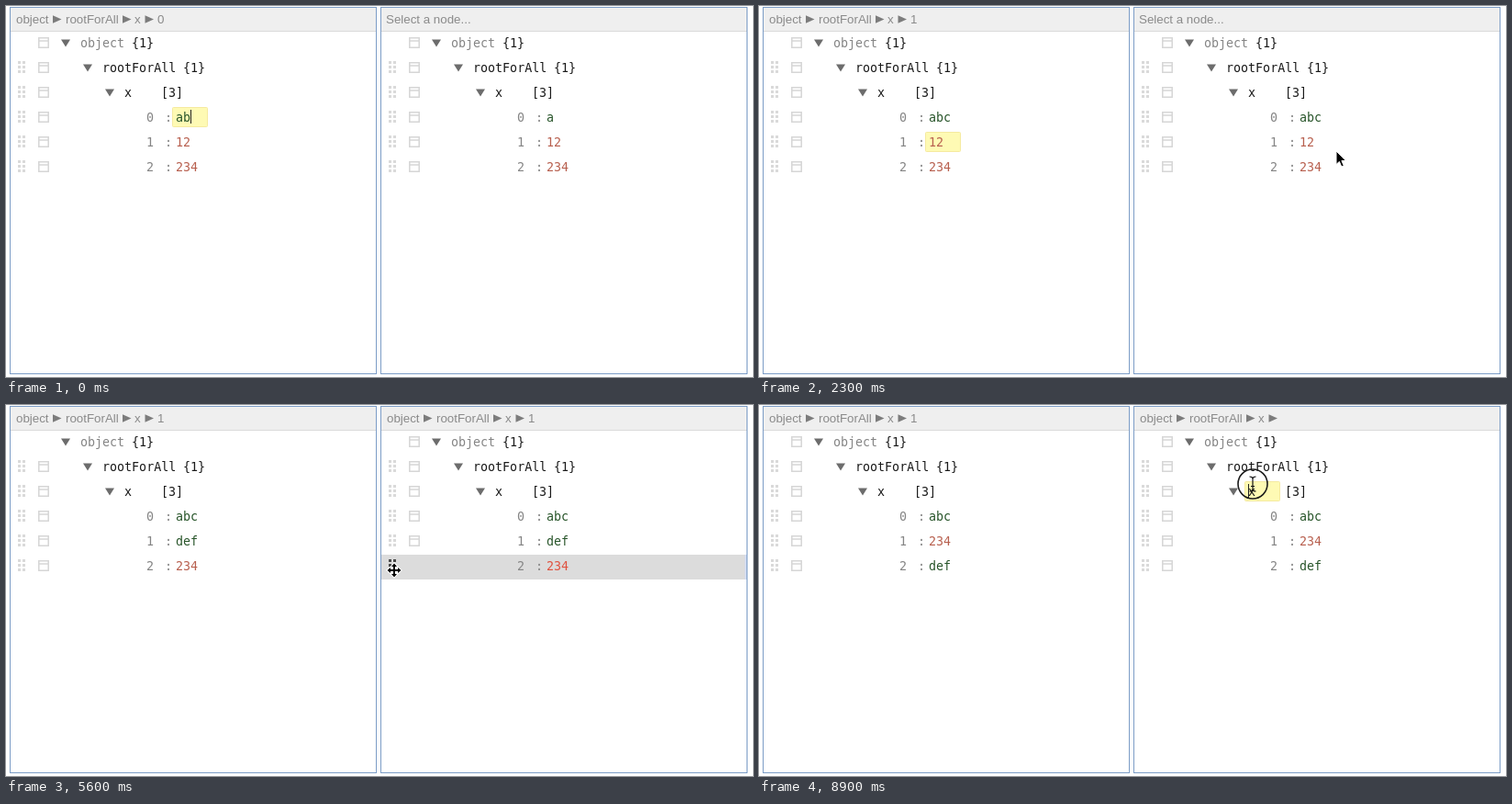
An HTML page that plays this animation: 814 by 404 pixels, repeating every 9100 ms.

```html
<!DOCTYPE html>
<html lang="en">
<head>
<meta charset="utf-8">
<title>Synchronised tree editors</title>
<style>
  html, body { margin: 0; width: 100%; height: 100%; overflow: hidden; background: #fff; }
  svg { display: block; width: 814px; height: 404px; }
  text { font: 13.333px "DejaVu Sans Mono", "Noto Sans Mono", monospace; fill: #1a1a1a; }
  .bar text { font-family: "Liberation Sans", Arial, sans-serif; fill: #8a8a8a; }
  .bar path { fill: #7c7c7c; }
  text.dim { fill: #858585; }
  text.str { fill: #28552a; }
  text.num { fill: #b8604f; }
  text.hot { fill: #e0523f; }
  .field { fill: #fefab4; stroke: #f5eaa0; }
  .fold { fill: #6c6c6c; }
  .dots { fill: #dadada; }
  .dots.on { fill: #4a4a4a; }
  .menu { fill: none; stroke: #d6d6d6; stroke-width: 1.5; }
  .menu.on { stroke: #505050; stroke-width: 2; }
  .ring { fill: none; stroke: #1c1c1c; stroke-width: 1.6; }
</style>
</head>
<body>
<svg id="stage" viewBox="0 0 814 404"></svg>
<script>
const LOOP = 9100, STEP = 100;
const LEFT = 0, RIGHT = 1, PANEL_GAP = 404;
const KEY_GAP = 150, SYNC_LAG = 200, BLINK = 500;

// Moments of the story, in ms
const pickLeft = 800, pickRight = 2800, typeRight = 3500, blur = 4900,
  overRow = 5300, grab = 5500, swap = 6200, drop = 6600, leaveRow = 7400, pickName = 8800;

const stage = document.getElementById('stage');
const rowY = i => 40 + 27 * i;
const within = (t, from, to) => t >= from && t < to;

const text = (x, y, s, cls = '') => `<text x="${x}" y="${y}" class="${cls}">${s}</text>`;
const rect = (x, y, w, h, attr) => `<rect x="${x}" y="${y}" width="${w}" height="${h}" ${attr}/>`;
const group = (x, y, s) => `<g transform="translate(${x} ${y})">${s}</g>`;

// The part of a word typed so far; the other panel follows after a delay
const typed = (word, start, t) => word.slice(0, Math.max(0, Math.floor((t - start) / KEY_GAP) + 1));

function valuesOf(side, t) {
  const lag = own => side === own ? 0 : SYNC_LAG;
  const first = typed('abc', lag(LEFT) - SYNC_LAG, t);
  const second = typed('def', typeRight + lag(RIGHT), t) || '12';
  const swapped = t >= (side === RIGHT ? swap : drop);
  return swapped ? [first, '234', second] : [first, second, '234'];
}

function pathOf(side, t) {
  if (side === LEFT) return t < pickLeft ? '0' : '1';
  if (t <= pickRight) return null;
  if (t >= pickName) return '';
  return within(t, grab + 300, drop) ? '2' : '1';
}

// The field in focus, if any: its panel, row and the time it was entered
function focusAt(t) {
  if (t < pickLeft) return { side: LEFT, row: 3, since: 0, typing: true };
  if (t < pickRight) return { side: LEFT, row: 4, since: pickLeft };
  if (t < typeRight) return { side: RIGHT, row: 4, since: pickRight };
  if (t < blur) return { side: RIGHT, row: 4, since: typeRight, typing: true };
  if (t >= pickName) return { side: RIGHT, row: 2, since: pickName };
}

function header(path) {
  let s = rect(5, 2, 398, 25, 'fill="#efefef"') + rect(5, 27, 398, 1, 'fill="#dadada"');
  if (path === null) {
    s += text(10, 19, 'Select a node...');
  } else {
    s += text(11, 19, 'object') + text(65, 19, 'rootForAll') + text(140, 19, 'x') + text(165, 19, path);
    for (const x of [51, 127, 151.5]) s += `<path d="M${x} 10.2l9.5 4.3l-9.5 4.3z"/>`;
  }
  return `<g class="bar">${s}</g>`;
}

function dots(y, on) {
  let d = '';
  for (let i = 0; i < 6; i++) d += `M${13 + 5 * (i % 2)} ${y - 7 + 5 * (i >> 1)}h3v3h-3z`;
  return `<path class="dots ${on ? 'on' : ''}" d="${d}"/>`;
}

const menu = (y, on) =>
  `<path class="menu ${on ? 'on' : ''}" d="M35.8 ${y - 5.2}h10.4v10.4h-10.4zM35.8 ${y - 2}h10.4"/>`;
const fold = (x, y) => `<path class="fold" d="M${x - 5} ${y - 3.5}h10l-5 8z"/>`;

function field(focus, values, t) {
  const { row, since, typing } = focus;
  const x = row === 2 ? 125.5 : 181.5, y = rowY(row);
  const chars = typing ? values[row - 3].length : 0;
  const lit = typing || Math.floor((t - since) / BLINK) % 2 === 0;
  return rect(x, y - 10.5, 38, 21, 'class="field" rx="1"')
    + (lit ? rect(x + 3.5 + 8 * chars, y - 8, 1, 15, 'fill="#222"') : '');
}

function panel(side, t) {
  const values = valuesOf(side, t), focus = focusAt(t);
  const active = side === RIGHT;
  const hover = active && within(t, overRow, leaveRow) ? (t < swap ? 5 : 4) : 0;
  const picked = active && within(t, drop, pickName) ? 4 : 0;
  const dragging = within(t, grab, drop);
  let s = header(pathOf(side, t));

  if (hover) {
    const y = rowY(hover) - 12;
    s += rect(5, y, 398, 27, 'fill="#dcdcdc"') + rect(401, y, 2, 27, 'fill="#d2dbef"');
    if (picked) s += rect(28, y, 26, 24, 'fill="#fff"');
  }
  for (let i = 0; i < 6; i++) {
    const y = rowY(i);
    if (i) s += dots(y, i === hover);
    if (!(dragging && i === hover)) s += menu(y, i && i === picked);
    if (i < 3) s += fold(65 + 24 * i, y);
  }
  if (focus && focus.side === side) s += field(focus, values, t);

  s += text(81, 45, 'object', 'dim') + text(137, 45, '{1}')
    + text(105, 72, 'rootForAll') + text(193, 72, '{1}')
    + text(129, 99, 'x') + text(169, 99, '[3]');
  values.forEach((v, i) => {
    const y = rowY(i + 3) + 5;
    const cls = isNaN(v) ? 'str' : hover === i + 3 ? 'hot' : 'num';
    s += text(153, y, i, 'dim') + text(173, y, ':', 'dim') + text(185, y, v, cls);
  });
  s += rect(4.5, 1.5, 399, 399, 'fill="none" stroke="#7b9cc6"');
  return group(side * PANEL_GAP, 0, s);
}

// Places where the pointer rests: arrival, departure, position
const rests = [
  { from: 600, to: 600, x: 203, y: 128 },
  { from: pickLeft, to: 1300, x: 195, y: 139 },
  { from: 1800, to: 2000, x: 198, y: 157 },
  { from: 2300, to: 2300, x: 629, y: 158 },
  { from: 2700, to: 4400, x: 598, y: 146 },
  { from: 4800, to: 5000, x: 592, y: 230 },
  { from: 5400, to: 5900, x: 423, y: 180 },
  { from: 6400, to: 7200, x: 418, y: 149 },
  { from: 7500, to: 8100, x: 452, y: 120 },
  { from: 8700, to: LOOP, x: 538, y: 86 }
];

function pointerPos(t) {
  const i = rests.findIndex(r => t <= r.to);
  const b = rests[i], a = rests[i - 1] || b;
  const k = t >= b.from ? 1 : (t - a.to) / (b.from - a.to);
  return [a.x + (b.x - a.x) * k, a.y + (b.y - a.y) * k];
}

const shapes = {
  beam: '<path d="M-3.5-8q3 0 3.5 2q.5-2 3.5-2M0-6V6M-3.5 8q3 0 3.5-2q.5 2 3.5 2M-2 2.5h4" fill="none" stroke="#111" stroke-width="1.2"/>',
  arrow: '<path d="M0 0V14.5L3.4 11.4L5.8 17L8.3 16L5.9 10.5H10.5Z" stroke="#fff"/>',
  move: '<path d="M0-7.5L3-4H1V-1H4V-3L7.5 0L4 3V1H1V4H3L0 7.5L-3 4H-1V1H-4V3L-7.5 0L-4-3V-1H-1V-4H-3Z" stroke="#fff" stroke-width="2" paint-order="stroke"/>'
};

function pointer(t) {
  // Hidden while the keyboard is in use
  if (t < 600 || within(t, typeRight, 4500)) return '';
  const [x, y] = pointerPos(t);
  const overText = t < 2100 || within(t, 2600, typeRight) || t >= 8600;
  const kind = overText ? 'beam' : within(t, overRow, 7300) ? 'move' : 'arrow';
  const click = [1100, pickRight, 3100, 4800, pickName].some(c => within(t, c, c + 200));
  const pressed = click || within(t, grab + 300, drop);
  return group(x, y, shapes[kind] + (pressed ? '<circle class="ring" r="16"/>' : ''));
}

const began = performance.now();
let shown = -1;
function draw() {
  const t = Math.floor((performance.now() - began) % LOOP / STEP) * STEP;
  if (t !== shown) {
    shown = t;
    stage.innerHTML = panel(LEFT, t) + panel(RIGHT, t) + pointer(t);
  }
  requestAnimationFrame(draw);
}
draw();
</script>
</body>
</html>
```
